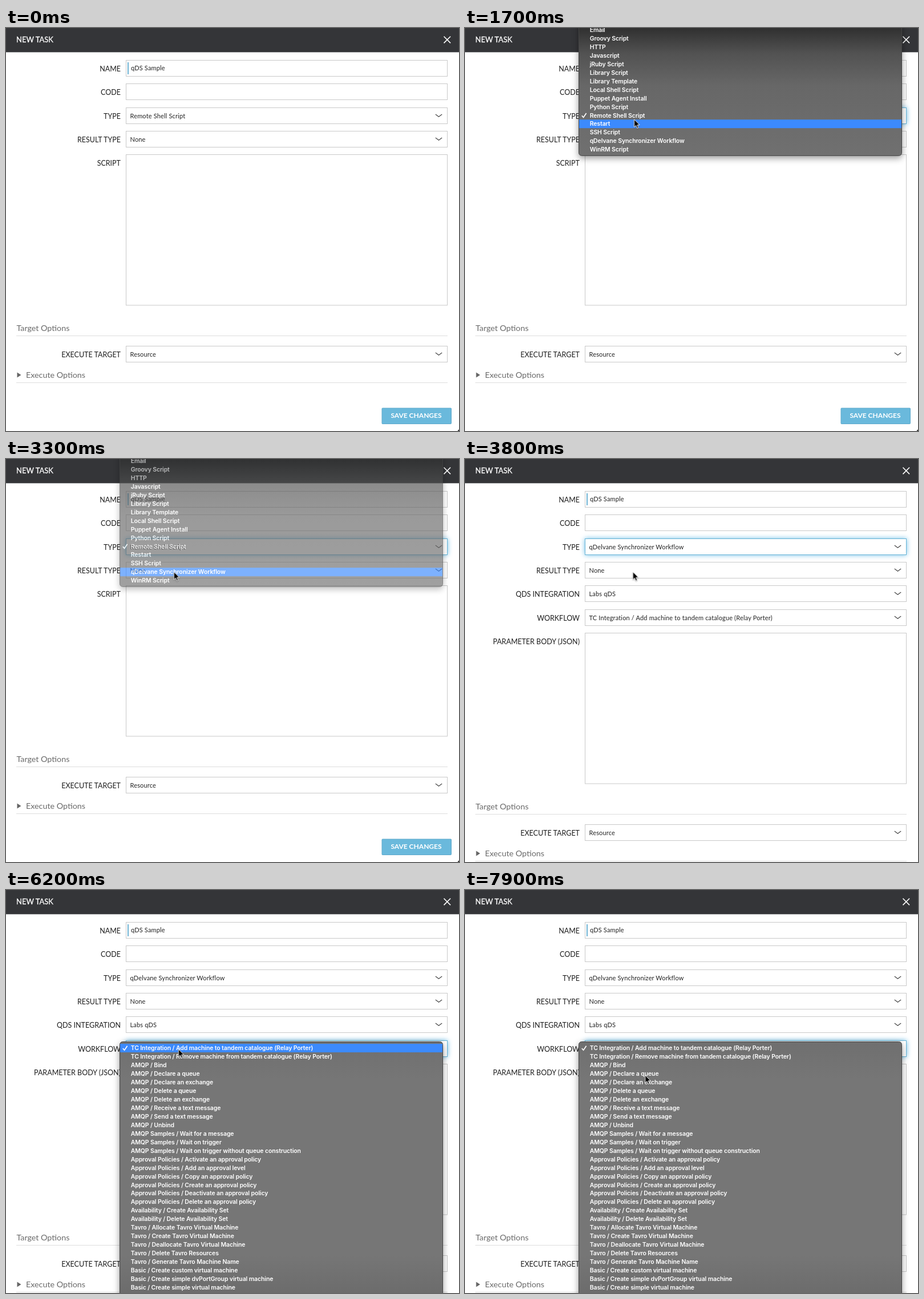
These frames come from a looping animation (794 by 705 pixels, 8 s). An HTML page:

```html
<!DOCTYPE html>
<html lang="en">
<head>
<meta charset="utf-8">
<title>New task form</title>
<style>
html, body { margin: 0; width: 100%; height: 100%; overflow: hidden; background: #fff; }
svg { display: block; width: 794px; height: 705px; font-family: Lato, "Open Sans", sans-serif; }

.title { font-size: 13px; fill: #fff; stroke: #fff; stroke-width: .3; }
.label { font-size: 12.5px; fill: #1e1e1e; text-anchor: end; }
.value { font-size: 11px; letter-spacing: .16px; fill: #222; }
.head { font-size: 14.3px; fill: #6a6a6a; }
.button { font-size: 12px; font-weight: 700; fill: #fff; text-anchor: middle; }
.item { font: 600 10.5px Inter, Roboto, sans-serif; letter-spacing: -.12px; fill: #fff; }
.box { fill: #fff; stroke: #c9c9c9; }
.line { stroke: #dedede; }
.chevron { fill: none; stroke: #444; stroke-width: 1.1; }
.check { fill: none; stroke: #fff; stroke-width: 1.7; }
.glow { fill: #fff; stroke: #66b3d6; filter: drop-shadow(0 0 4px rgba(82, 178, 226, .85)); }
.panel { stroke: #444; filter: drop-shadow(0 4px 6px rgba(0, 0, 0, .4)); }
.pick { fill: #3c8afd; }
.arrow { fill: #000; stroke: #fff; stroke-width: 1; filter: drop-shadow(0 1px 1px rgba(0, 0, 0, .35)); }

.before, .after, .old, .new, .low, .typeFocus, .flowFocus, .menu1, .menu2, .pick1, .pick2, .cursor {
  animation: 8s step-end infinite;
}
.before { animation-name: before; }
.after { animation-name: after; }
.old { animation-name: old; }
.new { animation-name: new; }
.low { animation-name: low; }
.typeFocus { animation-name: typeFocus; }
.flowFocus, .menu2 { animation-name: flowOpen; }
.menu1 { animation-name: menu1; }
.pick1 { animation-name: pick1; }
.pick2 { animation-name: pick2; }
.cursor { animation-name: cursor; animation-timing-function: ease-in-out; }

@keyframes before { 0% { opacity: 1; } 46.25%, 100% { opacity: 0; } }
@keyframes after { 0% { opacity: 0; } 46.25%, 100% { opacity: 1; } }
@keyframes old { 0% { opacity: 1; } 43.75%, 100% { opacity: 0; } }
@keyframes new { 0% { opacity: 0; } 43.75%, 100% { opacity: 1; } }
@keyframes low { 0% { transform: none; } 46.25%, 100% { transform: translateY(83px); } }
@keyframes typeFocus { 0% { opacity: 0; } 12.5% { opacity: 1; } 68.75%, 100% { opacity: 0; } }
@keyframes flowOpen { 0% { opacity: 0; } 68.75%, 100% { opacity: 1; } }
@keyframes menu1 {
  0% { opacity: 0; }
  12.5% { opacity: 1; }
  40% { opacity: 1; animation-timing-function: linear; }
  43.75%, 100% { opacity: 0; }
}
@keyframes pick1 {
  0% { transform: none; opacity: 1; }
  20% { transform: translateY(14.95px); opacity: 1; }
  25.6% { transform: translateY(29.9px); opacity: 1; }
  28% { transform: translateY(44.85px); opacity: 1; }
  36.25% { transform: translateY(44.85px); opacity: 0; }
  37.5%, 100% { transform: translateY(44.85px); opacity: 1; }
}
@keyframes pick2 {
  0% { transform: none; opacity: 1; }
  83.1% { transform: translateY(14.95px); opacity: 1; }
  85% { transform: translateY(29.9px); opacity: 1; }
  86.9% { transform: translateY(44.85px); opacity: 1; }
  98.75%, 100% { transform: translateY(44.85px); opacity: 0; }
}
@keyframes cursor {
  0% { transform: translate(455px, 400px); opacity: 0; animation-timing-function: step-end; }
  1.25% { transform: translate(455px, 400px); opacity: 1; }
  8.75%, 10% { transform: translate(313px, 168px); opacity: 1; }
  12.5% { transform: translate(300px, 155px); opacity: 1; }
  20%, 22.5% { transform: translate(296.5px, 159.8px); opacity: 1; }
  31.25%, 57.5% { transform: translate(294.3px, 197.5px); opacity: 1; }
  65%, 80% { transform: translate(302.3px, 278.5px); opacity: 1; }
  88.75%, 100% { transform: translate(315.7px, 324px); opacity: 1; }
}
</style>
</head>
<body>
<svg id="stage" viewBox="0 0 794 705"></svg>
<script>
const ROW = 14.95;
const rowTop = i => Math.round(56 + 41.33 * i) + .5;

const text = (cls, x, y, s) => `<text class="${cls}" x="${x}" y="${y}">${s}</text>`;
const group = (cls, ...parts) => `<g class="${cls}">${parts.join('')}</g>`;
const box = (y, h = 28, cls = 'box') => `<rect class="${cls}" x="210.5" y="${y}" width="563" height="${h}"/>`;
const line = y => `<path class="line" d="M18 ${y}H774"/>`;
const label = (y, s) => text('label', 201, y + 19.3, s);
const value = (y, s, x = 217.5) => text('value', x, y + 18, s);
const chevron = y => `<path class="chevron" d="M752.800 ${y + 11.5}l5.700 4.300l5.700 -4.300"/>`;
const select = (y, name, s) => label(y, name) + box(y) + value(y, s) + chevron(y);

// Vertical gradient between y1 and y2, with [offset, colour] stops.
const shade = (id, y1, y2, stops) =>
  `<linearGradient id="${id}" gradientUnits="userSpaceOnUse" x1="0" x2="0" y1="${y1}" y2="${y2}">` +
  stops.map(([at, c]) => `<stop offset="${at}" stop-color="${c}"/>`).join('') + '</linearGradient>';

// Popup list: y is the panel top, mid the centre of the first row.
function menu(n, items, y, h, mid, checked) {
  const at = i => mid + i * ROW;
  const c = at(checked);
  return group('menu' + n,
    `<rect class="panel" x="199.5" y="${y}" width="566" height="${h}" rx="5" fill="url(#shade${n})"/>`,
    `<rect class="pick pick${n}" x="200" y="${c - 7.5}" width="565" height="15"/>`,
    `<path class="check" d="M204.8 ${c + .5}l2.8 3.2l5 -7.4"/>`,
    ...items.map((s, i) => text('item', 218.7, at(i) + 3.8, s)));
}

const types = ['Email', 'Groovy Script', 'HTTP', 'Javascript', 'jRuby Script', 'Library Script',
  'Library Template', 'Local Shell Script', 'Puppet Agent Install', 'Python Script',
  'Remote Shell Script', 'Restart', 'SSH Script', 'qDelvane Synchronizer Workflow', 'WinRM Script'];

const flows = Object.entries({
  'TC Integration': ['Add machine to tandem catalogue (Relay Porter)',
    'Remove machine from tandem catalogue (Relay Porter)'],
  'AMQP': ['Bind', 'Declare a queue', 'Declare an exchange', 'Delete a queue', 'Delete an exchange',
    'Receive a text message', 'Send a text message', 'Unbind'],
  'AMQP Samples': ['Wait for a message', 'Wait on trigger', 'Wait on trigger without queue construction'],
  'Approval Policies': ['Activate an approval policy', 'Add an approval level', 'Copy an approval policy',
    'Create an approval policy', 'Deactivate an approval policy', 'Delete an approval policy'],
  'Availability': ['Create Availability Set', 'Delete Availability Set'],
  'Tavro': ['Allocate Tavro Virtual Machine', 'Create Tavro Virtual Machine',
    'Deallocate Tavro Virtual Machine', 'Delete Tavro Resources', 'Generate Tavro Machine Name'],
  'Basic': ['Create custom virtual machine', 'Create simple dvPortGroup virtual machine',
    'Create simple virtual machine']
}).flatMap(([folder, names]) => names.map(s => folder + ' / ' + s));

const [nameY, codeY, typeY, resultY, hostY, flowY] = [0, 1, 2, 3, 4, 5].map(rowTop);
const targetY = 556.5;

document.getElementById('stage').innerHTML = [
  '<defs>',
  shade('shade1', 0, 223, [[0, '#303030'], [.2, '#525252'], [.45, '#676767'], [1, '#707070']]),
  shade('shade2', 265, 705, [[0, '#6f6f6f'], [.15, '#767676'], [.85, '#767676'], [1, '#6c6c6c']]),
  '</defs>',
  '<rect width="794" height="705" fill="#fff"/>',

  group('low',
    group('before', label(hostY, 'SCRIPT')),
    group('after', label(hostY, 'PARAMETER BODY (JSON)')),
    box(hostY, 263.5),
    text('head', 18.5, 530, 'Target Options'), line(538.5),
    select(targetY, 'EXECUTE TARGET', 'Resource'),
    '<path d="M19.5 602.5l7 4.5l-7 4.5z" fill="#666"/>',
    text('head', 35, 612, 'Execute Options'), line(620.5),
    '<rect x="659" y="665" width="121.5" height="27.5" rx="1" fill="#6ab9dc" stroke="#5fa9cb"/>',
    text('button', 719, 682.3, 'SAVE CHANGES')),
  group('before', '<path d="M794 702v3h-2.5z" fill="#222"/>'),

  label(nameY, 'NAME'), box(nameY),
  '<rect x="213" y="60" width="2" height="21" fill="#70b4d4"/>',
  value(nameY - .3, 'qDS Sample', 219),
  label(codeY, 'CODE'), box(codeY),
  label(typeY, 'TYPE'), box(typeY), group('typeFocus', box(typeY, 28, 'glow')), chevron(typeY),
  group('old', value(typeY, types[10])),
  group('new', value(typeY, types[13])),
  select(resultY, 'RESULT TYPE', 'None'),
  group('after',
    select(hostY, 'QDS INTEGRATION', 'Labs qDS'),
    label(flowY, 'WORKFLOW'), box(flowY), group('flowFocus', box(flowY, 28, 'glow')),
    value(flowY, flows[0]), chevron(flowY)),

  '<rect width="794" height="42.4" fill="#343538"/>',
  text('title', 18, 25.2, 'NEW TASK'),
  '<path d="M767.5 14.8l11.6 11.6m0 -11.6l-11.6 11.6" stroke="#fff" stroke-width="1.6"/>',

  menu(1, types, -20, 243.3, 3.2, 10),
  menu(2, flows, 265.5, 480, 276.5, 0),
  group('cursor', '<path class="arrow" d="M0 0v13.6l3.1 -2.9l2.1 4.8l2.3 -1l-2 -4.7h4.2z"/>')
].join('');
</script>
</body>
</html>
```
